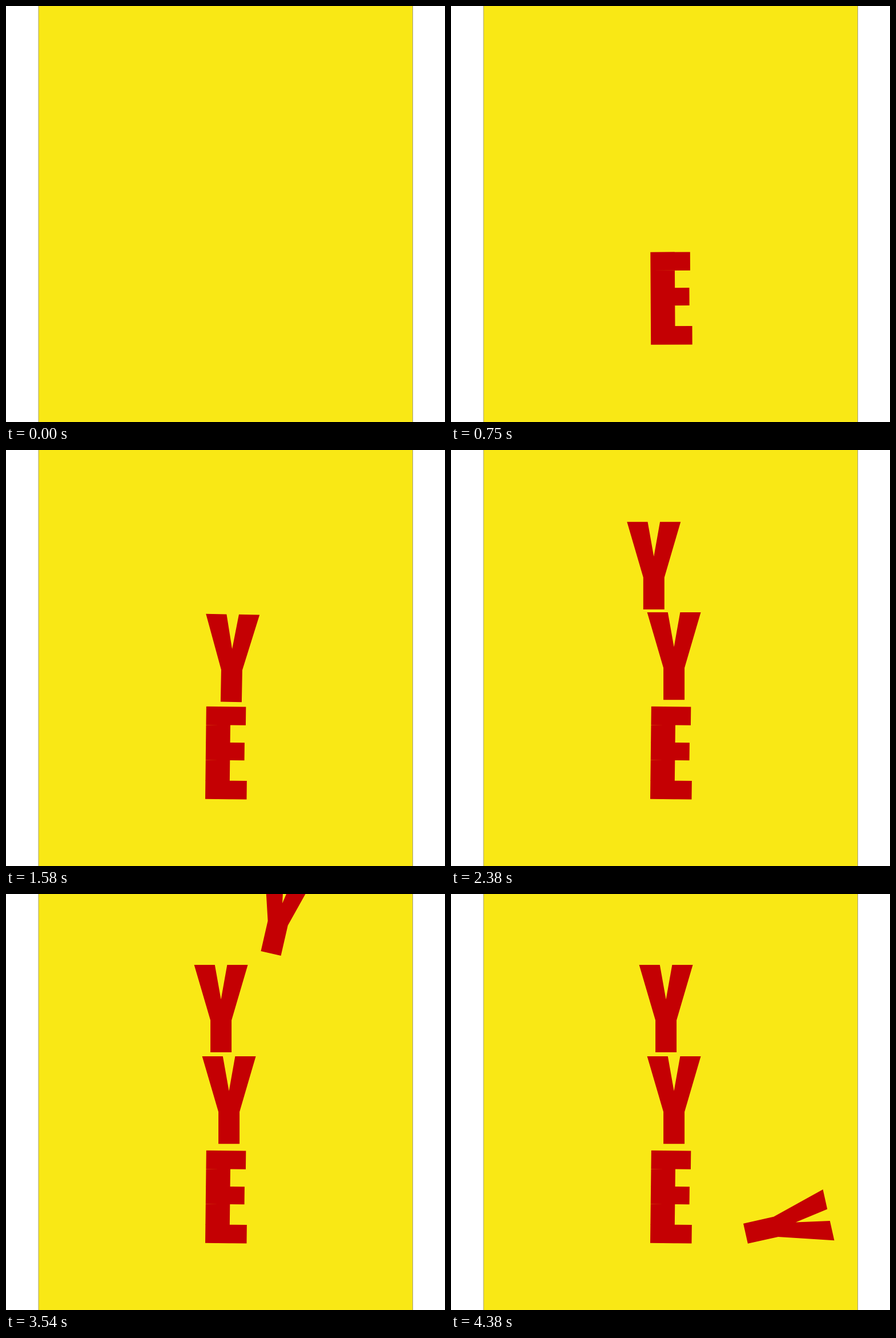
Animation of 769x728 px, one loop 5000 ms. Source, as an HTML page with a canvas:

```html
<!DOCTYPE html>
<html lang="en">
<head>
<meta charset="utf-8">
<title>Falling letters</title>
<style>
  html, body { margin: 0; width: 100%; height: 100%; overflow: hidden; background: #fff; }
  canvas { display: block; }
</style>
</head>
<body>
<canvas id="stage" width="769" height="728" role="img" aria-label="Y Y Y E"></canvas>
<script>
const ctx = document.getElementById('stage').getContext('2d');
const LOOP = 5000, FPS = 24;

// Both letters stand with the middle of their foot at the origin.
function outlineY() {
  const half = [[18.5, 0], [18.5, -56], [47, -153.2], [10.8, -153.2], [0, -92.5]];
  half.forEach(([x, y]) => ctx.lineTo(x, y));
  half.reverse().forEach(([x, y]) => ctx.lineTo(-x, y));
  ctx.closePath();
}

function outlineE() {
  const left = -36.3;
  const bar = (top, width, height) => ctx.rect(left, top, width, height);
  bar(-162, 42.5, 162);
  bar(-162, 69.5, 32.3);
  bar(-99.3, 67.8, 31);
  bar(-32.5, 72.5, 32.5);
}

// An act is a fall from one pose to a hit, then a fading wobble into rest.
// A pose holds x, y and tilt in degrees; rock is the extra tilt of the wobble,
// beat its half period in ms, pull the power of the fall.
const pose = (time, x, y, tilt = 0) => ({ time, x, y, tilt });
const act = (from, hit, rest, rock, beat, pull = 2) => ({ from, hit, rest, rock, beat, pull });

const tipping = pose(3541.6, 464, 104, 12.9);
const letters = [
  { outline: outlineE, size: 1, acts: [
    act(pose(45, 384, 0, 1.2), pose(622, 384, 631, 1.2), pose(1115, 385.3, 611.1, 0.65), 6.5, 125)] },
  { outline: outlineY, size: 1, acts: [
    act(pose(960, 386.5, 0), pose(1430, 386.5, 433.5), pose(2030, 390.6, 437.3), -16, 150)] },
  { outline: outlineY, size: 1, acts: [
    act(pose(1620, 355.3, 0), pose(2375, 355.3, 279), pose(2750, 376.6, 277.1), 14, 125)] },
  { outline: outlineY, size: 0.973, acts: [
    act(pose(2860, 416, 0), pose(3375, 416, 112), tipping, -25, 334),
    act(tipping, pose(4083.3, 514, 569, 73.6), pose(4375, 516, 594.2, 77.4), 0, 584, 1)] }
];

const clamp = p => Math.min(1, Math.max(0, p));
const mix = (a, b, p) => a + (b - a) * p;

function poseAt({ from, hit, rest, rock, beat, pull }, t) {
  if (t < hit.time) {
    const p = clamp((t - from.time) / (hit.time - from.time));
    return pose(t, mix(from.x, hit.x, p), mix(from.y, hit.y, p ** pull), mix(from.tilt, hit.tilt, p));
  }
  const u = clamp((t - hit.time) / (rest.time - hit.time));
  const fade = 1 - u * u;
  const phase = Math.PI * (t - hit.time) / beat;
  const swing = Math.cos(phase) * fade;
  return pose(t,
    mix(rest.x, hit.x, swing),
    mix(rest.y, hit.y, swing),
    mix(rest.tilt, hit.tilt, swing) + rock * Math.sin(phase) * fade);
}

function drawLetter({ outline, size, acts }, t) {
  const current = acts.filter(a => t >= a.from.time).pop();
  if (!current) return;
  const { x, y, tilt } = poseAt(current, t);
  ctx.save();
  ctx.translate(x, y);
  ctx.rotate(tilt * Math.PI / 180);
  ctx.scale(size, size);
  ctx.beginPath();
  outline();
  ctx.fill();
  ctx.restore();
}

function draw(t) {
  ctx.fillStyle = '#fff';
  ctx.fillRect(0, 0, 769, 728);
  ctx.fillStyle = '#f9e815';
  ctx.fillRect(57, 0, 656, 728);
  ctx.fillStyle = '#a5a07a';
  ctx.fillRect(56.5, 0, 1, 728);
  ctx.fillRect(712, 0, 1, 728);
  ctx.fillStyle = '#c40003';
  letters.forEach(letter => drawLetter(letter, t));
}

const start = performance.now();
function tick(now) {
  const t = Math.max(0, now - start) % LOOP;
  // The motion advances in whole film steps.
  draw(Math.floor((t + 5) * FPS / 1000) * 1000 / FPS);
  requestAnimationFrame(tick);
}
draw(0);
requestAnimationFrame(tick);
</script>
</body>
</html>
```
